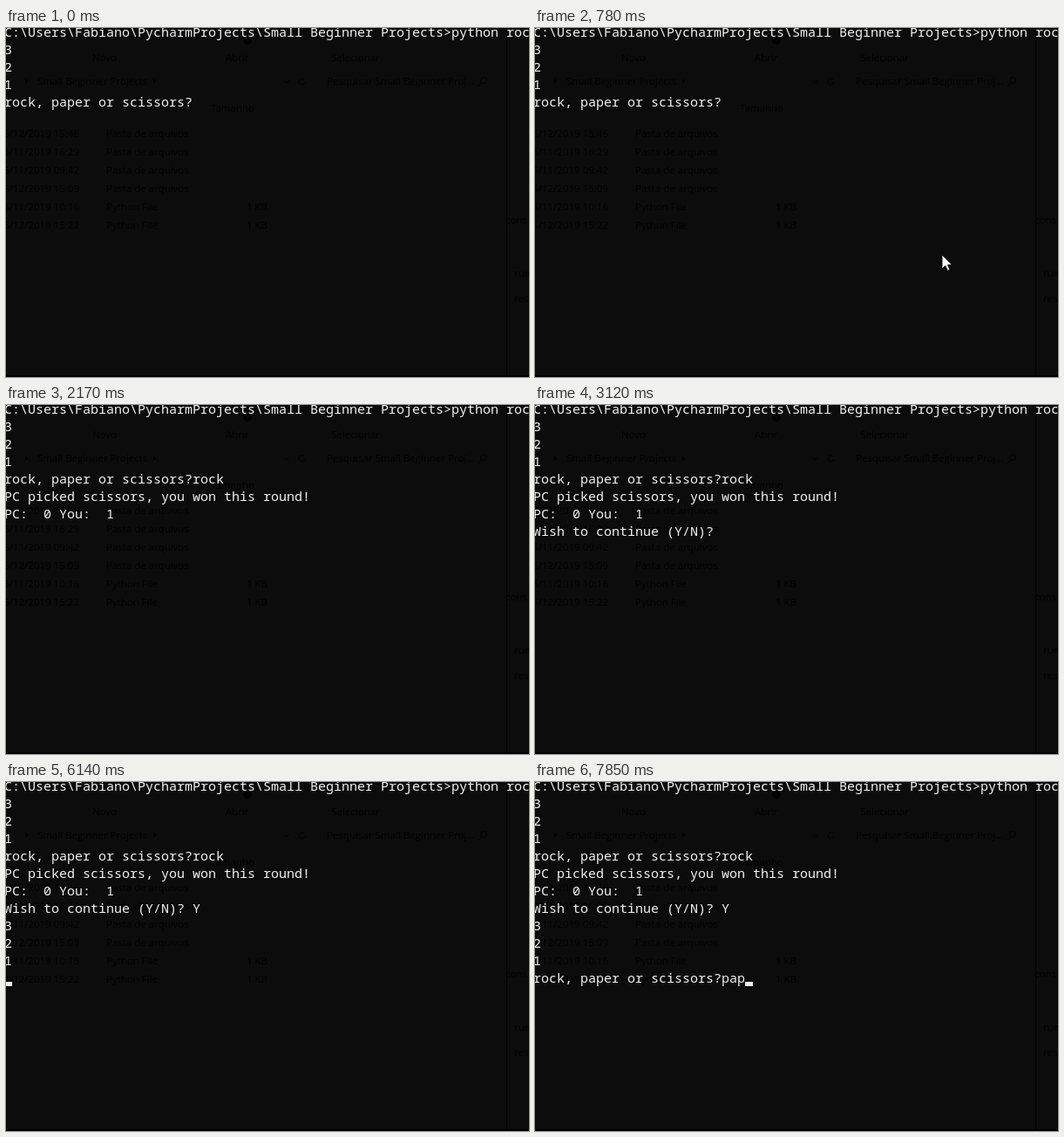
These frames come from a looping animation (600x400 px, 8000 ms). An HTML page:

```html
<!DOCTYPE html>
<html lang="en">
<head>
<meta charset="utf-8">
<title>Rock, paper, scissors</title>
<style>
  html, body { margin: 0; width: 100%; height: 100%; overflow: hidden; background: #0c0c0c; }
  svg { display: block; width: 600px; height: 400px; }
  text { white-space: pre; }
  #rows { font: 15px "Noto Sans Mono", "DejaVu Sans Mono", monospace; fill: #f2f2f2; }
  #ghost { font: 11.5px "Open Sans", "Noto Sans", sans-serif; fill: #020202; }
  #ghost .line { fill: none; stroke: #020202; }
</style>
</head>
<body>
<svg viewBox="0 0 600 400">
  <rect width="600" height="400" fill="#0c0c0c"/>
  <g id="ghost">
    <path class="line" d="M574.5 0V398M319 60l3 3 3-3M342 59a3.5 3.5 0 1 0 1 3M545 63l-3 4"/>
    <circle class="line" cx="548" cy="60" r="3.5"/>
    <circle cx="277" cy="14" r="5"/>
    <path d="M169 58l4 3-4 3zM22 58l4 3-4 3z"/>
  </g>
  <rect y="398" width="600" height="2" fill="#000"/>
  <g id="rows"></g>
  <rect id="caret" width="9" height="5" fill="#f2f2f2"/>
  <path id="mouse" d="M0 0V16L3.8 12.5L6.4 18.2L9 17L6.5 11.5H11.5Z" fill="#fff" stroke="#000" stroke-width=".8"/>
</svg>
<script>
const LOOP = 8000, CELL = 9, ROW = 20, LEFT = -2;
const $ = id => document.getElementById(id);

function addText(parent, x, y, str, anchor = "start") {
  const el = document.createElementNS("http://www.w3.org/2000/svg", "text");
  el.setAttribute("x", x);
  el.setAttribute("y", y);
  el.setAttribute("text-anchor", anchor);
  el.textContent = str;
  parent.append(el);
  return el;
}

// Window faintly visible behind the console
const ghost = (x, y, str, anchor) => addText($("ghost"), x, y, str, anchor);
ghost(113, 38, "Novo", "middle");
ghost(265, 38, "Abrir", "middle");
ghost(401, 38, "Selecionar", "middle");
ghost(36, 65, "Small Beginner Projects");
ghost(368, 65, "Pesquisar Small Beginner Proj...");
ghost(235, 96, "Tamanho");
["15/12/2019 15:46", "15/11/2019 16:29", "15/11/2019 09:42",
 "15/12/2019 15:09", "15/11/2019 10:16", "15/12/2019 15:22"].forEach((date, i) => {
  const y = 125 + 21 * i;
  ghost(84, y, date, "end");
  ghost(115, y, i < 4 ? "Pasta de arquivos" : "Python File");
  if (i > 3) ghost(300, y, "1 KB", "end");
});
ghost(573, 224, "cons");
ghost(583, 285, "rue");
ghost(583, 314, "res");

const ASK = "rock, paper or scissors?";
const WISH = "Wish to continue (Y/N)? ";
const START = ["C:\\Users\\Fabiano\\PycharmProjects\\Small Beginner Projects>python rock", "3", "2", "1"];
const RESULT = ["PC picked scissors, you won this round!", "PC:  0 You:  1"];
const round1 = [...START, ASK + "rock"];
const asked = [...round1, ...RESULT, WISH];
const again = [...round1, ...RESULT, WISH + "Y"];
const replay = typed => [...again, "3", "2", "1", ASK + typed];

// [time, lines, caret visible]; the caret sits at the end of the last line
const SCREENS = [
  [0, [...START, ASK], false],
  [1010, [...START, ASK], true],
  [1530, [...START, ASK], false],
  [1660, [...START, ASK + "r"], true],
  [1760, [...START, ASK + "ro"], true],
  [1910, [...START, ASK + "roc"], true],
  [1990, round1, true],
  [2080, round1, false],
  [2150, [...round1, ...RESULT], false],
  [2220, asked, true],
  [3120, asked, false],
  [3630, asked, true],
  [4140, asked, false],
  [4630, again, true],
  [4690, again, false],
  [5160, [...again, "3", ""], true],
  [5660, [...again, "3", "2", ""], true],
  [6140, [...again, "3", "2", "1", ""], true],
  [6630, replay(""), true],
  [7290, replay(""), false],
  [7600, replay("p"), true],
  [7700, replay("pa"), true],
  [7850, replay("pap"), true]
];

// [time, x, y] of the pointer tip; no position means off stage
const POINTER = [
  [0], [80, 468, 391], [130, 450, 383], [180, 430, 370], [230, 411, 352],
  [280, 396, 333], [320, 385, 315], [360, 378, 302], [410, 374, 293],
  [670, 386, 287], [730, 424, 273], [780, 467, 260], [820, 512, 249],
  [870, 550, 241], [920, 578, 236], [960]
];

const rows = Array.from({ length: 12 }, (_, i) => addText($("rows"), LEFT, 10 + ROW * i, ""));
const latest = (steps, t) => steps.findLast(step => step[0] <= t);
const place = (el, x, y) => el.setAttribute("transform", `translate(${x} ${y})`);
const show = (el, on) => el.setAttribute("visibility", on ? "visible" : "hidden");
let shown;

function draw(now) {
  const t = now % LOOP;
  const screen = latest(SCREENS, t);
  if (screen !== shown) {
    const [, lines, caretOn] = shown = screen;
    rows.forEach((row, i) => row.textContent = lines[i] || "");
    const last = lines.length - 1;
    place($("caret"), LEFT + CELL * lines[last].length, 9 + ROW * last);
    show($("caret"), caretOn);
  }
  const [, x, y] = latest(POINTER, t);
  show($("mouse"), x !== undefined);
  if (x !== undefined) place($("mouse"), x, y);
}

const origin = performance.now();
function tick() {
  draw(performance.now() - origin);
  requestAnimationFrame(tick);
}
tick();
</script>
</body>
</html>
```
